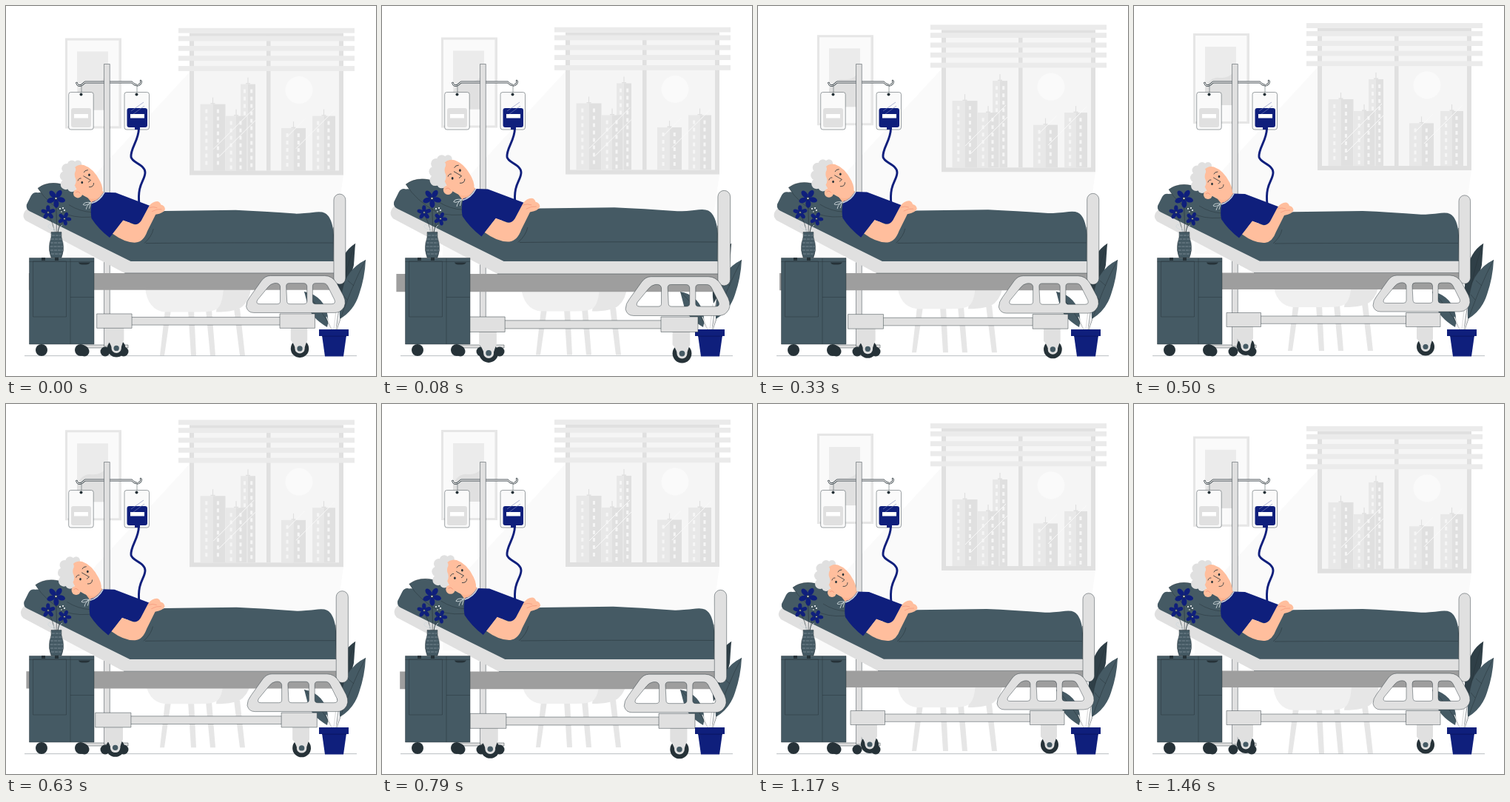
Animation of 500x500 px, one loop 1.54 s. Source, as an HTML page:

```html
<!DOCTYPE html>
<html lang="en">
<head>
<meta charset="utf-8">
<title>Hospital bed</title>
<style>
html, body { margin: 0; width: 100%; height: 100%; overflow: hidden; background: #fff; }
svg { display: block; width: 100vw; height: 100vh; }
.ln { stroke: #263238; stroke-width: .45; }
.no { fill: none; }
</style>
</head>
<body>
<svg viewBox="0 0 500 500" xmlns="http://www.w3.org/2000/svg">
  <g id="room">
    <path fill="#fafafa" d="M248 90L82 270V342H440L456 229Z"/>
    <path fill="#e6e6e6" d="M80 44H156V166H80Z"/>
    <path fill="#fafafa" d="M83 47H152.500V163H83Z"/>
    <path fill="#ebebeb" d="M96 62H138V141H96Z"/>
    <path fill="#e0e0e0" d="M96 118Q103 102 116 104Q131 105 138 91V141H96Z"/>

    <path fill="#e0e0e0" d="M248 37H456V229H248Z"/>
    <path fill="#f5f5f5" d="M254 42H450V223H254Z"/>
    <circle cx="396" cy="114" r="18.5" fill="#fafafa"/>
    <g id="city"></g>
    <path class="no" stroke="#fafafa" d="M280 194L335 139M288 204L337 155M381 176L404 153M392 193L444 141"/>
    <path fill="#e0e0e0" d="M352 40H357.5V223H352Z"/>
    <g id="slats" fill="#ebebeb"></g>

    <g fill="#e6e6e6">
      <path d="M215 411H223L214 473H208ZM246 411H254L257 473H250ZM270 411H278L283 473H276ZM308 409H316L323 473H316Z"/>
      <path d="M288 380H331Q330 397 320 406Q311 414 284 414Z"/>
      <path fill="#f0f0f0" d="M188 380H294Q293 404 285 410Q279 414 262 414H215Q203 413 196 404Q189 395 188 380Z"/>
    </g>
  </g>

  <path d="M25 472.700H474" stroke="#8a9398" stroke-width=".6"/>

  <g id="plant">
    <path fill="#2f3f47" d="M472 321Q454 332 449 360Q445 385 448 402Q465 375 470 350Z"/>
    <path fill="#455a64" d="M403 386Q425 390 433 411Q437 425 434 434Q412 421 408 405Z"/>
    <path fill="#455a64" d="M486 343Q460 356 454 385Q450 408 451 423Q470 412 477 390Q485 367 486 343Z"/>
    <path class="no" stroke="#263238" stroke-width=".5" d="M486 343Q466 380 447 437M455 390L461 397M462 371L470 378M472 321Q456 360 446 437M403 386Q424 405 440 437"/>
    <path class="no" stroke="#e0e0e0" stroke-width="1.300" d="M451 422L446 437M433 420L440 437M447 403L443 437"/>
    <path fill="#0f1f7c" d="M427 445H460L456 473.500H431Z"/>
    <path fill="#0f1f7c" d="M423 437H463V446H423Z"/>
    <path stroke="#08124f" stroke-width=".6" d="M427 446.200H460"/>
  </g>

  <g id="drip">
    <path fill="#e0e0e0" class="ln" d="M105 458H165V462H105Z"/>
    <g fill="#263238"><circle cx="105" cy="466" r="7"/><circle cx="134" cy="467" r="6.500"/><circle cx="159" cy="467" r="6.500"/></g>
    <g class="no" stroke-linecap="round">
      <path id="arm" stroke="#263238" stroke-width="2.300" d="M95.500 104Q97 109 102 107L107 103H170Q175 108 179 107Q184 104 182 101"/>
      <use href="#arm" style="stroke:#e0e0e0"/>
    </g>
    <path class="no" stroke="#e0e0e0" stroke-width="1.300" stroke-linecap="round" d="M95.500 104Q97 109 102 107L107 103H170Q175 108 179 107Q184 104 182 101"/>
    <path fill="#e0e0e0" class="ln" d="M132.500 78.500H140.300V460H132.500Z"/>
    <path class="no ln" d="M102 107V119M177 107V119"/>
    <rect x="84.700" y="116.500" width="33.500" height="50.500" rx="3" fill="#fafafa" class="ln"/>
    <rect x="160" y="116.500" width="33.500" height="50.500" rx="3" fill="#fafafa" class="ln"/>
    <rect x="88" y="138" width="27" height="26" rx="3" fill="#e0e0e0"/>
    <rect x="163.500" y="138" width="27.500" height="26" rx="3" fill="#0f1f7c"/>
    <path fill="#0f1f7c" d="M174 163H181V167H174Z"/>
    <path fill="#fff" d="M92 146H111V151.500H92ZM168 146H187V151.500H168Z"/>
    <path stroke="#7f88bb" stroke-width=".6" d="M169 142L186 130M172 146L187 135"/>
    <g fill="#263238"><circle cx="101.500" cy="119.500" r="2"/><circle cx="176.500" cy="119.500" r="2"/></g>
    <path class="no" stroke="#0f1f7c" stroke-width="2.900" d="M179.500 165C179.500 182 168 192 169 204C170 212 188 214 188 225C188 236 177 240 180 268"/>
  </g>

  <g id="bed">
    <path fill="#9e9e9e" d="M35 360.500H440V383H35Z"/>
    <g id="wheels"></g>
    <g fill="#e0e0e0">
      <path class="ln" d="M170 419H368V429.300H170Z"/>
      <path class="ln" d="M125 414.500H171.500V433.500H125ZM367.500 414.500H414V433.500H367.500Z"/>
    </g>
    <path fill="#e0e0e0" d="M32 276Q24 284 31 291L162 360.500H440V343H172L37 276Z"/>
    <path class="no ln" d="M162 360.500H440"/>
    <path fill="#455a64" d="M47 254Q41 252.500 38 258L32 270Q31 276 36 278.500L170 344.800H438.500L439 310Q437 286 427 281Q423 279 415 279.800Q396 282 388 281.800Q345 278.500 309 277L215 278.300L150 300L62 257Q52 253 47 254Z"/>
    <path class="no" stroke="#263238" stroke-width=".5" d="M190 321Q300 320 438 320.500M200 302Q198 312 188 321M438.500 300V345"/>
    <path fill="#455a64" class="ln" d="M47 248Q60 238 80 243L119 264L126 285Q104 289 86 283Q60 269 47 248Z"/>
    <path class="no ln" d="M88 270Q102 279 119 280"/>

    <path fill="#ffb591" d="M108 254L133 252L139 258L120 270Z"/>
    <g fill="#e0e0e0">
      <circle cx="84" cy="243" r="7"/><circle cx="82.500" cy="232" r="6.500"/><circle cx="85" cy="222" r="6.500"/>
      <circle cx="92" cy="217" r="6"/><circle cx="100" cy="216" r="5"/><circle cx="91" cy="233" r="12"/><circle cx="92" cy="247" r="6"/>
    </g>
    <path fill="#ffbe9d" d="M94 223Q99 215.500 108 217.500Q121 222 129.500 239Q135 250 131.500 257Q126 264 115 261.500Q104 257 98 249Q92 239 94 223Z"/>
    <circle cx="100" cy="255" r="6" fill="#ffbe9d"/>
    <path fill="#e0e0e0" d="M93 219Q98 220 97 225Q95 228 96 233Q99 239 96 244L90 245Z"/>
    <path class="no" stroke="#f28f74" stroke-width=".8" d="M97 254Q100 251 103 255"/>
    <g fill="#263238"><ellipse cx="105.500" cy="240.500" rx="1.300" ry="1.700"/><ellipse cx="115" cy="230.500" rx="1.300" ry="1.700"/></g>
    <path class="no" stroke="#263238" stroke-width=".8" stroke-linecap="round" d="M100 238Q101 234.500 104 235M108 227Q109 224 113 224M107.500 232L117 237.500L114 240M115 246.500Q121 247 121 241.500"/>

    <path fill="#0f1f7c" d="M119 266Q127 265 134 253.500L150 254L200 273L185 294L179 297L160 291L142 313.500Q127 302 118 288Q116 277 119 266Z"/>
    <path class="no" stroke="#cfd8dc" stroke-width="1.600" d="M118 268Q129 265 135 253.500"/>
    <path class="no" stroke="#cfd8dc" stroke-width=".9" d="M117 267Q108 266 107 270Q111 272 117 267Q111 272 111 276M117 267L115 275"/>
    <path fill="#ffbe9d" d="M160 290.500L146 308.500Q163 321 177 320Q187 319 192 305L203 283Q214 281 215.500 276Q215 271 210 270Q208 264 202 266Q196 268 193 274L184 291Q180 297 174 296Z"/>
    <path class="no" stroke="#f28f74" stroke-width=".6" d="M194 274Q200 272 205 274M198 279Q205 275 211 276"/>

    <rect x="439" y="255.800" width="15.600" height="119.500" rx="7.800" fill="#e0e0e0" class="ln"/>
    <path fill="#e0e0e0" class="ln" fill-rule="evenodd" d="M355 364H427Q437 364 443 374L452 391Q457 402 450 409Q446 413 440 413H333Q325 413 323 405Q323 398 328 392L343 371Q348 364 355 364ZM360 374Q355 375 352 379L338 396Q335 401.500 341 401.500H364Q368 401.500 368 398V378Q367 373 360 374ZM380 374Q376 374 376 378L377 398Q377 401.500 381 401.500H399Q403.500 401.500 403.500 398V378Q403 374 399 374ZM415 374Q411 374 411 378V398Q411 401.500 415 401.500H436Q442 401.500 440 396L431 378Q429 374 425 374Z"/>
  </g>

  <g id="cabinet">
    <g fill="#263238"><circle cx="48" cy="465" r="8"/><circle cx="101" cy="465" r="8"/><circle cx="106" cy="467" r="6.500"/></g>
    <path fill="#455a64" class="ln" d="M31.500 340.500H119V457H31.500Z"/>
    <path class="no ln" d="M87 341V457M87 393.500H119M36.500 345H81.500V420H36.500ZM31.500 345.500H119"/>
    <path fill="#263238" d="M98 346.500H114Q112 349.500 108 349.500H103Q99 349.500 98 346.500ZM48 340H53V344H48ZM66 340H71V344H66Z"/>
    <path class="no" stroke="#263238" stroke-width=".6" d="M67 262Q69 290 68 306M57 281Q64 294 66 306M79 290Q71 298 70 306M76 275L70 306"/>
    <path class="no" stroke="#cfd8dc" stroke-width=".8" d="M66 306Q65 298 59 295Q54 298 60 301Q64 302 66 306M72 306Q71 299 76 296"/>
    <path fill="#455a64" class="ln" d="M61 305.500H75Q74 312 77 320Q79 330 75 340H61Q57 330 59 320Q62 312 61 305.500Z"/>
    <path class="no" stroke="#b0bec5" stroke-width=".45" stroke-dasharray="4 1" d="M62 310H74M61 315H75M60 320H76M59.500 325H77M60 330H77M61 335H75"/>
    <g id="blooms"></g>
    <g fill="#fff"><circle cx="73" cy="274" r="1"/><circle cx="77" cy="273" r="1"/><circle cx="79" cy="276" r="1"/><circle cx="75" cy="278" r=".8"/></g>
  </g>
</svg>
<script>
const $ = id => document.getElementById(id);
const rect = (x, y, w, h, fill) => `<rect x="${x}" y="${y}" width="${w}" height="${h}"${fill ? ` fill="${fill}"` : ''}/>`;
const disc = (x, y, r, fill) => `<circle cx="${x}" cy="${y}" r="${r}" fill="${fill}"/>`;

function tower(x, y, w) {
  const half = w / 2, base = 223;
  let out = rect(x + half - .6, y - 9, 1.2, 9, '#e0e0e0') + rect(x + half - 3, y - 1.5, 6, 1.5, '#e0e0e0') +
    rect(x, y, half, base - y, '#e8e8e8') + rect(x + half, y, half, base - y, '#e0e0e0');
  for (let wy = y + 7; wy < base - 6; wy += 10)
    for (const k of [.2, .66]) out += rect(x + w * k, wy, 3, 5, '#f5f5f5');
  return out;
}

function bloom(x, y, r, turn) {
  let out = '';
  for (let i = 0; i < 5; i++)
    out += `<ellipse cx="${r * .58}" rx="${r * .45}" ry="${r * .28}" fill="#0f1f7c" transform="translate(${x} ${y}) rotate(${turn + i * 72})"/>`;
  return out + disc(x, y, r * .15, '#263238') + disc(x, y, r * .08, '#fff');
}

// Tyre, then the fork that covers its top, then the hub.
function wheel(x, y) {
  return disc(x, y, 12, '#263238') + disc(x, y, 6.5, '#e0e0e0') +
    `<path fill="#e0e0e0" d="M${x - 12} ${y - 28}h22v17q-2 4 -4 11h-12q-2 -7 -6 -11z"/>` +
    disc(x, y, 3.6, '#455a64');
}

$('city').innerHTML = tower(317, 106, 20) + tower(297, 149, 28) + tower(262.5, 133, 34) +
  tower(372, 165.5, 33) + tower(414, 149, 31);
$('slats').innerHTML = [30.2, 41, 54.3, 67.7, 81.5].map(y => rect(233, y, 238, 6.8)).join('');
$('blooms').innerHTML = bloom(67.5, 260, 12.5, 15) + bloom(57, 279, 9.5, -20) + bloom(79, 287.5, 9, 5);
$('wheels').innerHTML = wheel(151, 460) + wheel(394, 460.5);

const LOOP = 1540, CYCLE = 1500, TICK = 1000 / 24, LEAD = 30;
const beat = [[0, 1], [.1, 1.1], [.3, 1], [.4, 1], [.5, 1.1], [.6, 1], [1, 1]];

function along(keys, p) {
  const i = Math.max(1, keys.findIndex(k => p <= k[0]));
  const [a, u] = keys[i - 1], [b, v] = keys[i];
  return u + (v - u) * (p - a) / (b - a);
}

// Motion advances in 24 steps a second and rests on the last one.
function draw(ms) {
  const step = Math.min(35, Math.floor((ms % LOOP + 5) / TICK));
  const p = (step * TICK + LEAD) / CYCLE;
  const rise = 10 * (1 - Math.abs(1 - 2 * p));
  $('room').setAttribute('transform', `translate(0 ${-rise})`);
  $('bed').setAttribute('transform', `translate(242 341) scale(${along(beat, p)}) translate(-242 -341)`);
}

const start = performance.now();
function tick() {
  draw(performance.now() - start);
  requestAnimationFrame(tick);
}
tick();
</script>
</body>
</html>
```
